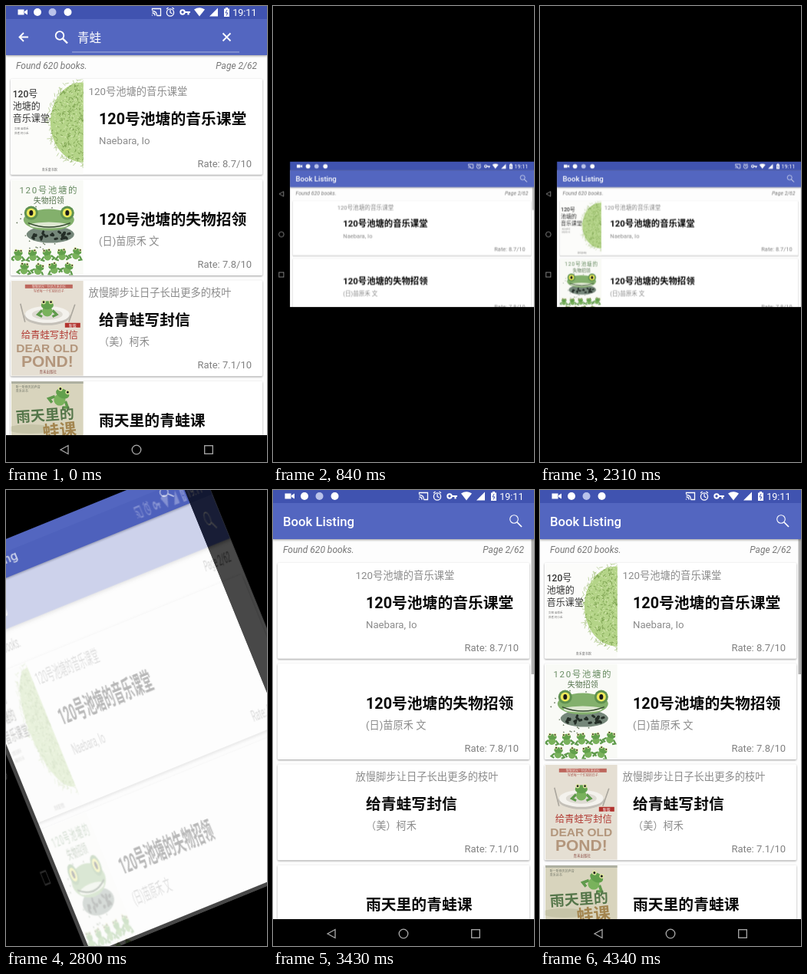
Write an HTML page that moves like this. It is 340 by 594 pixels and loops after 4.41 s.

```html
<!DOCTYPE html>
<html lang="zh-CN">
<head>
<meta charset="utf-8">
<title>Book Listing</title>
<style>
  html, body { margin: 0; width: 100%; height: 100%; overflow: hidden; background: #000; }
  #stage { display: block; width: 340px; height: 594px; }
  text { font-family: Roboto, "Noto Sans CJK SC", "Noto Sans CJK JP", sans-serif; }
  .end { text-anchor: end; }
  .mid { text-anchor: middle; }
  .title { font-size: 19.8px; font-weight: 700; fill: #080808; }
  .sub { font-size: 13.3px; fill: #8b8b8b; }
  .by { font-size: 13.2px; fill: #8b8b8b; }
  .rate { font-size: 13px; fill: #808080; }
  .info { font-size: 12px; font-style: italic; fill: #777; }
  .heading { font-size: 16.7px; font-weight: 500; fill: #fff; }
  .card { fill: #fff; filter: drop-shadow(0 1px 1.2px rgba(0, 0, 0, .38)); }
  .bar { filter: drop-shadow(0 1px 1.5px rgba(0, 0, 0, .4)); }
  .block { font-family: "Liberation Sans", sans-serif; font-weight: 700; fill: #b3967c; }
  .line { fill: none; stroke: #fff; }

  .layer { transform-origin: 170px 297.25px; }
  .before { animation: before-turn 4410ms infinite, before-fade 4410ms infinite; }
  .wide { animation: wide-turn 4410ms infinite, wide-fade 4410ms infinite; }
  .after { animation: after-turn 4410ms infinite, after-show 4410ms step-end infinite; }
  .bands { animation: bands 4410ms step-end infinite; }
  .wide .content { animation: wide-content 4410ms step-end infinite; }
  .wide .covers { animation: wide-covers 4410ms step-end infinite; }
  .wide .thumb { animation: wide-thumb 4410ms infinite; }
  .after .content, .after .system { animation: after-content 4410ms step-end infinite; }
  .after .covers { animation: after-covers 4410ms step-end infinite; }

  /* turns: 140-596 ms and 2690-3146 ms */
  @keyframes before-turn {
    0% { transform: rotate(0deg) scale(1, 1); animation-timing-function: step-end; }
    3.175% { transform: rotate(90deg) scale(.56, .572); animation-timing-function: cubic-bezier(.22, 1, .36, 1); }
    13.515%, 100% { transform: rotate(0deg) scale(1, .32); }
  }
  @keyframes before-fade {
    0%, 3.175% { opacity: 1; animation-timing-function: cubic-bezier(.28, 1, .58, 1); }
    13.515%, 100% { opacity: 0; }
  }
  @keyframes wide-turn {
    0%, 3.175% { transform: rotate(90deg) scale(1, 1); animation-timing-function: cubic-bezier(.22, 1, .36, 1); }
    13.515% { transform: rotate(0deg) scale(1, 1); animation-timing-function: step-end; }
    60.998% { transform: rotate(-90deg) scale(1.747, 1.79); animation-timing-function: cubic-bezier(.22, 1, .36, 1); }
    71.338%, 100% { transform: rotate(0deg) scale(1, 3.126); }
  }
  @keyframes wide-fade {
    0% { opacity: 0; animation-timing-function: step-end; }
    3.175%, 60.998% { opacity: 1; animation-timing-function: cubic-bezier(.2, 1, .5, 1); }
    71.338%, 100% { opacity: 0; }
  }
  @keyframes after-turn {
    0%, 60.998% { transform: rotate(-90deg); animation-timing-function: cubic-bezier(.22, 1, .36, 1); }
    71.338%, 100% { transform: rotate(0deg); }
  }
  @keyframes after-show { 0% { opacity: 0; } 60.998%, 100% { opacity: 1; } }
  @keyframes bands { 0% { opacity: 0; } 3.175% { opacity: 1; } 60.998%, 100% { opacity: 0; } }
  @keyframes wide-content { 0% { opacity: 0; } 12.698%, 100% { opacity: 1; } }
  @keyframes wide-covers { 0% { opacity: 0; } 33.333%, 100% { opacity: 1; } }
  @keyframes wide-thumb { 0%, 25.397% { opacity: 1; } 30.159%, 100% { opacity: 0; } }
  @keyframes after-content { 0% { opacity: 0; } 71.429%, 100% { opacity: 1; } }
  @keyframes after-covers { 0% { opacity: 0; } 88.889%, 100% { opacity: 1; } }
</style>
</head>
<body>
<svg id="stage" viewBox="0 0 340 594"></svg>
<script>
const books = [
  { title: "120号池塘的音乐课堂", sub: "120号池塘的音乐课堂", by: "Naebara, Io", rate: "8.7" },
  { title: "120号池塘的失物招领", by: "(日)苗原禾 文", rate: "7.8" },
  { title: "给青蛙写封信", sub: "放慢脚步让日子长出更多的枝叶", by: "（美）柯禾", rate: "7.1" },
  { title: "雨天里的青蛙课", by: "苗小雨", rate: "6.9" }
];
const PITCH = 131.2;

let seed = 7;
const random = () => (seed = (seed * 16807) % 2147483647) / 2147483647;
const text = (x, y, label, attrs = "") => `<text x="${x}" y="${y}" ${attrs}>${label}</text>`;
const rect = (x, y, w, h, fill, more = "") =>
  `<rect x="${x}" y="${y}" width="${w}" height="${h}" fill="${fill}" ${more}/>`;
const oval = (x, y, rx, ry, fill) => `<ellipse cx="${x}" cy="${y}" rx="${rx}" ry="${ry}" fill="${fill}"/>`;
const path = (d, attrs) => `<path d="${d}" ${attrs}/>`;

// Short random strokes over an ellipse, or over its rim when inner is near 1.
function strokes(count, cx, cy, rx, ry, length, inner = 0) {
  let d = "";
  for (let i = 0; i < count; i++) {
    const a = random() * Math.PI * 2, b = random() * Math.PI * 2;
    const r = inner + (1 - inner) * Math.sqrt(random());
    d += `M${(cx + rx * r * Math.cos(a)).toFixed(1)} ${(cy + ry * r * Math.sin(a)).toFixed(1)}` +
         `l${(length * Math.cos(b)).toFixed(1)} ${(length * Math.sin(b)).toFixed(1)}`;
  }
  return d;
}

const frog = (x, y, s, turn = 0) => `<g transform="translate(${x} ${y}) rotate(${turn}) scale(${s})">
  ${path("M-5 2L-9 6L-5 8M5 2L9 6L5 8", 'fill="none" stroke="#5f9a4c" stroke-width="2.4"')}
  ${oval(0, 3, 5, 5, "#79b25c")}${oval(0, -3, 6, 4, "#62a04c")}
  ${oval(-3.5, -6, 2, 2, "#dfe6a0")}${oval(3.5, -6, 2, 2, "#dfe6a0")}
  ${oval(-3.5, -6, 1, 1, "#222")}${oval(3.5, -6, 1, 1, "#222")}</g>`;

function pondCover() {
  return rect(0, 0, 94, 124, "#fcfcfa") +
    path(strokes(150, 93, 56, 45, 56, 5, .9), 'stroke="#a9c583" stroke-width=".7"') +
    oval(93, 56, 42, 52, "#b4d488") +
    path(strokes(420, 93, 56, 42, 53, 3), 'stroke="#7fa453" stroke-width="1"') +
    path(strokes(260, 93, 56, 41, 51, 2), 'stroke="#d3e6ae" stroke-width="1"') +
    ["120号", "池塘的", "音乐课堂"].map((line, i) =>
      text(2, 24 + i * 15.7, line, 'font-size="12" font-weight="500" fill="#333"')).join("") +
    text(4, 66, "文图 苗原禾", 'font-size="3.6" fill="#777"') +
    text(4, 72, "译者 柯小禾", 'font-size="3.6" fill="#777"') +
    text(50, 120, "青禾童书馆", 'font-size="4" fill="#666" class="mid"');
}

function springCover() {
  const eye = x => oval(x, 43, 9, 9, "#5f9150") + oval(x, 43, 6, 6, "#ece95a") + oval(x, 43, 2.5, 3.5, "#191919");
  let small = "";
  for (let i = 0; i < 9; i++)
    small += frog(9 + (i % 5) * 19 + (i > 4 ? 8 : 0), (i > 4 ? 113 : 94) + random() * 5, .95, random() * 50 - 25);
  return rect(0, 0, 94, 124, "#f9faf6") +
    text(49, 17, "120号池塘的", 'font-size="11.5" letter-spacing="1.6" fill="#688c62" class="mid"') +
    text(49, 30, "失物招领", 'font-size="10" fill="#57744f" class="mid"') +
    path(strokes(45, 47, 62, 44, 32, 1.5), 'stroke="#66785d" stroke-width="1.5"') +
    oval(51, 71, 31, 11, "#75877a") + oval(49, 52, 33, 14, "#83b06c") + eye(26) + eye(73) +
    oval(49, 59, 25, 4, "#dfe8d2") + path("M22 56Q49 67 77 56", 'fill="none" stroke="#33482f" stroke-width="1.5"') +
    path(strokes(22, 51, 73, 25, 7, 2.5), 'stroke="#242e27" stroke-width="3" stroke-linecap="round"') + small;
}

function letterCover() {
  return rect(0, 0, 94, 124, "#e5dfd3") + rect(18, 5, 62, 5, "#bd665c") +
    text(49, 9, "慢慢读完一封远方来的信", 'font-size="4" fill="#f5e6df" class="mid"') +
    text(49, 15, "写给每一个忙碌的日子", 'font-size="4" fill="#a9584f" class="mid"') +
    oval(47, 46, 30, 12, "#c4c0b8") + oval(47, 44, 29, 11, "#f4f2ed") + oval(47, 44, 20, 7, "#dedbd3") +
    path("M12 30L18 54M83 31L75 54", 'stroke="#aaa69d" stroke-width="1.6"') + frog(47, 36, 1.35) +
    rect(70, 55, 20, 6, "#b2332e") + text(80, 60, "新版", 'font-size="5" fill="#fff" class="mid"') +
    text(50, 75, "给青蛙写封信", 'font-size="12.4" font-weight="500" fill="#b23c35" class="mid"') +
    `<g class="mid">` + text(47, 93, "DEAR OLD", 'font-size="15.5" class="block"') +
    text(47, 112, "POND!", 'font-size="21" class="block"') + `</g>` +
    text(48, 120, "青禾出版社", 'font-size="4.5" fill="#8a4a42" class="mid"');
}

function rainCover() {
  return rect(0, 0, 94, 124, "#d8d4bd") + rect(0, 0, 94, 3, "#aeb0a1") +
    text(6, 9, "听一听雨天的声音", 'font-size="4" fill="#777b6d"') +
    text(6, 14, "青禾丛书", 'font-size="4" fill="#777b6d"') +
    frog(65, 20, 1.5, 25) + oval(25, 62, 30, 6, "#c6c4a8") +
    text(6, 51, "雨天里的", 'font-size="19" font-weight="700" fill="#55764a" transform="rotate(-4 40 45)"') +
    text(41, 72, "蛙课", 'font-size="22" font-weight="700" fill="#a3854f" transform="rotate(-6 60 66)"');
}

function statusBar(w, left) {
  const icons = path("M15.5 7.5h8v7h-8zM24 10l4-2.5v7l-4-2.5z", 'fill="#fff"') +
    oval(41, 11, 5, 5, "#fff") + oval(60.5, 11, 5, 5, "#b9c2ea") + oval(80.5, 11, 5, 5, "#fff");
  const right = path("M190.5 8.5V6.5h11v9h-5M190.5 15.5v-1M190.5 12q3.5 0 3.5 3.5M190.5 9.5q6 0 6 6", 'class="line" stroke-width="1.3"') +
    path("M214 8v3.5l2.5 1.5M209 7l2.5-2M219 7l-2.5-2", 'class="line" stroke-width="1.2"') +
    `<circle cx="214" cy="11.5" r="4.6" class="line" stroke-width="1.3"/>` +
    `<circle cx="230" cy="11" r="2.7" class="line" stroke-width="2"/>` +
    path("M232.5 11h7.5M237.5 11v3.5", 'class="line" stroke-width="2.2"') +
    path("M245 7.5Q252 3 259 7.5L252 16.5z", 'fill="#fff"') +
    path("M265 16.5L276 5.5V16.5z", 'fill="#fff"') +
    path("M284 6.5h2V5h3v1.5h2v10.5h-7z", 'fill="#fff"') +
    path("M288 8l-2 4h3l-2 3.5", 'fill="none" stroke="#4053b0" stroke-width="1"') +
    text(326.5, 15.5, "19:11", 'font-size="12.6" fill="#fff" class="end"');
  return rect(left, 0, w - left, 20, "#4053b0") +
    `<g transform="translate(${left})">${icons}</g><g transform="translate(${w - 340})">${right}</g>`;
}

const magnifier = (x, y, width) => `<circle cx="${x - 2}" cy="${y - 2}" r="5.3" class="line" stroke-width="${width}"/>` +
  path(`M${x + 2} ${y + 2}l6 6`, `class="line" stroke-width="${width + .6}"`);

function toolbar(w, left, height, searching) {
  const y = 20 + height / 2;
  const inside = searching
    ? path(`M29 ${y}H18M23 ${y - 5.5}L17.5 ${y}l5.5 5.5M282.5 ${y - 5}l10 10m0-10l-10 10`, 'class="line" stroke-width="1.8"') +
      magnifier(72, y, 1.8) + text(93, y + 6, "青蛙", 'font-size="15.5" fill="#fff"') +
      rect(86, 62.5, 218, 1, "#a9b3e0")
    : text(left + 13, y + 6, "Book Listing", 'class="heading"') + magnifier(w - 24, y - .5, 1.1);
  return rect(left, 20, w - left, height, "#5366c0", 'class="bar"') + inside;
}

function navigation(points) {
  const [[ax, ay], [bx, by], [cx, cy]] = points;
  return `<g fill="none" stroke="#aaa" stroke-width="1.3">` +
    path(`M${ax - 5} ${ay}l10-5.5v11z`, "") + `<circle cx="${bx}" cy="${by}" r="5.8"/>` +
    rect(cx - 5.3, cy - 5.3, 10.6, 10.6, "none") + `</g>`;
}

function screen({ w, h, left, bottom, bar, keys, thumb, searching }) {
  const top = 20 + bar, x = left + 6, first = top + 30.8;
  let cards = "", covers = "";
  books.forEach((book, i) => {
    const y = first + i * PITCH;
    if (y > bottom) return;
    cards += rect(x, y, w - x - 6, 125, "#fff", 'class="card" rx="1.5"') +
      (book.sub ? text(x + 101.5, y + 21, book.sub, 'class="sub"') : "") +
      text(x + 115, y + 59, book.title, 'class="title"') +
      text(x + 115, y + 85, book.by, 'class="by"') +
      text(w - 20, y + 115, `Rate: ${book.rate}/10`, 'class="rate end"');
    covers += `<use href="#cover${i}" x="${x + .8}" y="${y + .6}"/>`;
  });
  return rect(0, 0, w, h, "#000") + rect(left, 20, w - left, bottom - 20, "#fdfdfd") +
    `<g class="content">` +
    text(left + 13, top + 18, "Found 620 books.", 'class="info"') +
    text(w - 13, top + 18, "Page 2/62", 'class="info end"') + cards +
    `<g class="covers">${covers}</g>` +
    (thumb ? rect(w - 3.5, top, 3.5, thumb, "#b0b0b0", 'class="thumb"') : "") + `</g>` +
    toolbar(w, left, bar, searching) + rect(left, bottom, w - left, h - bottom, "#000") +
    `<g class="system">${statusBar(w, left)}${navigation(keys)}</g>`;
}

const tall = { w: 340, h: 597, left: 0, bottom: 562, bar: 47, keys: [[76, 581], [170, 581], [264, 581]] };
const wide = { w: 594, h: 332, left: 38.5, bottom: 332, bar: 38.5, thumb: 52, keys: [[19, 74], [19, 166], [19, 258]] };
const tallView = options =>
  `<svg width="340" height="594" viewBox="0 3 340 594">${screen({ ...tall, ...options })}</svg>`;

const covers = [pondCover, springCover, letterCover, rainCover];
document.getElementById("stage").innerHTML =
  `<defs><clipPath id="coverEdge"><rect width="94" height="124"/></clipPath>` +
  covers.map((draw, i) => `<g id="cover${i}" clip-path="url(#coverEdge)">${draw()}</g>`).join("") + `</defs>` +
  rect(0, 0, 340, 594, "#000") +
  `<g class="layer after">${tallView({ thumb: 176 })}</g>` +
  `<g class="layer wide"><svg y="202.5" width="340" height="190" viewBox="0 0 594 332">${screen(wide)}</svg></g>` +
  `<g class="layer before">${tallView({ searching: true })}</g>` +
  `<g class="bands">${rect(0, 0, 340, 202.5, "#000")}${rect(0, 392.5, 340, 201.5, "#000")}</g>`;
</script>
</body>
</html>
```
